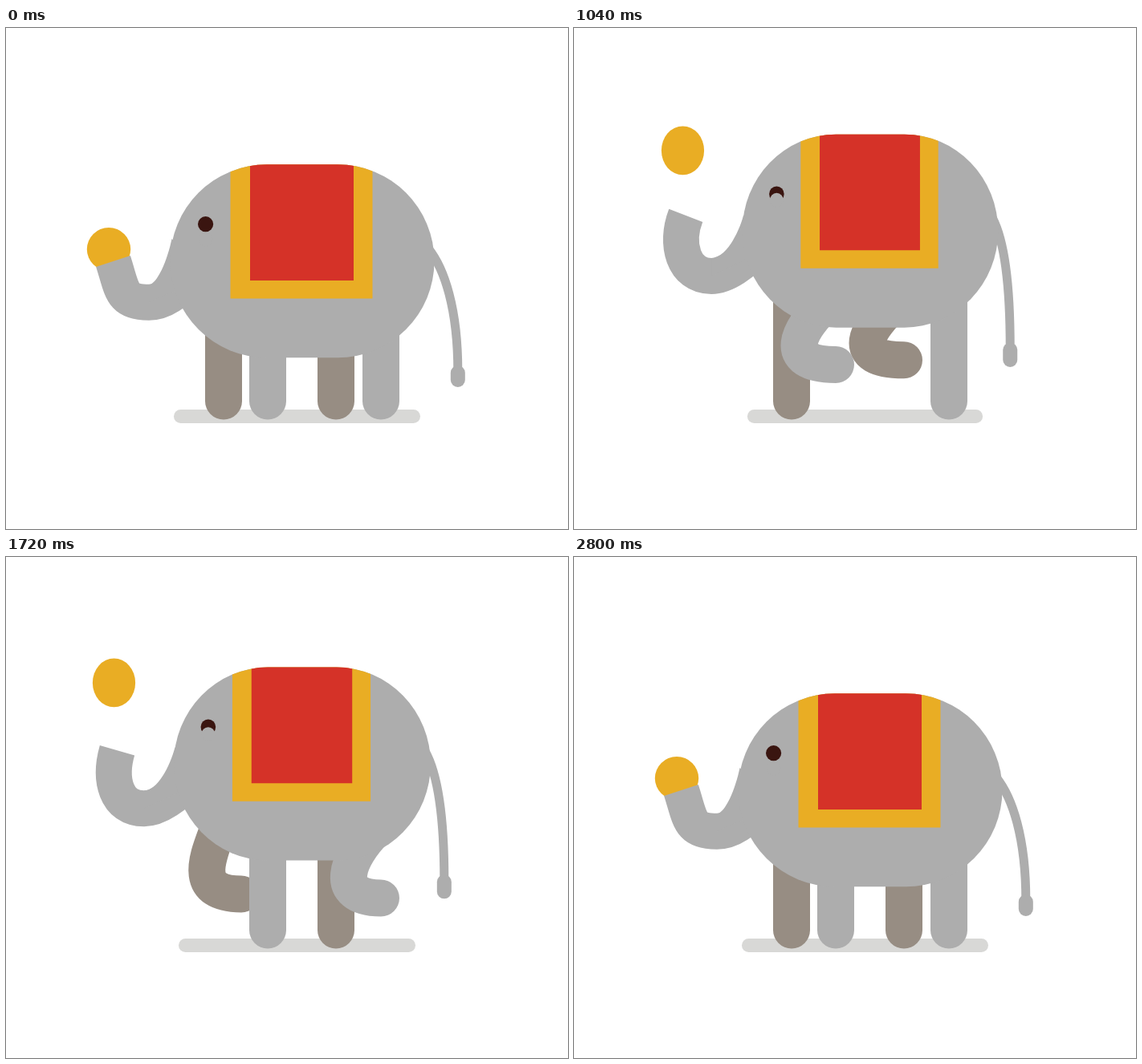
Animation, 700 px wide and 625 px high, one loop 3000 ms. Source, as an HTML page with a canvas:

```html
<!DOCTYPE html>
<html lang="en">
<head>
<meta charset="utf-8">
<title>Elephant</title>
<style>
html, body { margin: 0; width: 100%; height: 100%; overflow: hidden; background: #fff; }
canvas { display: block; }
</style>
</head>
<body>
<canvas id="stage" width="700" height="625"></canvas>
<script>
const ctx = document.getElementById('stage').getContext('2d');
const GREY = '#adadad', FAR = '#978d83', GOLD = '#e9ad24', RED = '#d53228',
      SHADE = '#d8d8d6', EYE = '#3a1510';
// Time is counted in steps; each hop lasts HOP steps.
const LOOP = 3000, STEP = 40, LAST = 70, HOP = 16, HOPS_END = 4 * HOP;
const PEAK = 9, THROW = 2.3;

const ease = x => x ** 1.75 / (x ** 1.75 + (1 - x) ** 1.75);

// Rise from start to PEAK, fall back until the hop ends.
function hump(t, start) {
  if (t <= start) return 0;
  return t < PEAK ? ease((t - start) / (PEAK - start)) : ease((HOP - t) / (HOP - PEAK));
}

function line(color, width, draw, cap = 'round') {
  ctx.strokeStyle = color;
  ctx.lineWidth = width;
  ctx.lineCap = cap;
  ctx.beginPath();
  draw();
  ctx.stroke();
}

function fill(color, draw) {
  ctx.fillStyle = color;
  ctx.beginPath();
  draw();
  ctx.fill();
}

const oval = (color, x, y, rx, ry) =>
  fill(color, () => ctx.ellipse(x, y, rx, ry, 0, 0, Math.PI * 2));

const rect = (color, x1, y1, x2, y2) =>
  fill(color, () => ctx.rect(x1, y1, x2 - x1, y2 - y1));

const bodyShape = dy => ctx.roundRect(204.5, 170.3 + dy, 329, 241, 120.5);

// The knee swings back by k while the foot is lifted.
function leg(color, x, k, lift = 40, reach = 0) {
  const foot = 465.5 - lift * k, fx = x + reach * k;
  line(color, 46, () => {
    ctx.moveTo(x - 7 * k, 340);
    ctx.bezierCurveTo(fx - 42 * k, 375, fx - 62 * k, foot, fx, foot);
  });
}

function ballTop(n, t) {
  const fall = 121 + 1.38 * (t - PEAK) ** 2;
  const landed = 121 + 1.38 * (t + HOP - PEAK) ** 2;
  if (n >= HOPS_END) return Math.min(249, landed);
  if (t < THROW) return n < HOP ? 249 - 1.5 * t : Math.min(247, landed);
  return t < PEAK ? 121 + 121 * ((PEAK - t) / (PEAK - THROW)) ** 2.17 : fall;
}

function drawBall(n, t, sway) {
  const top = ballTop(n, t), height = Math.max(0, (249 - top) / 128);
  const ry = 27 + 3.5 * Math.sqrt(height);
  oval(GOLD, 128 + 6.5 * sway, top + ry, 27.2 - height * 0.6, ry);
}

function drawTrunk(s) {
  const angle = (34 * s - 18) * Math.PI / 180;
  const tipX = 133.5 + 5 * s, tipY = 291 - 17 * s;
  const lowX = 178 - 6 * s, lowY = 342.3 + 4.2 * s;
  line(GREY, 45, () => {
    ctx.moveTo(tipX, tipY);
    ctx.bezierCurveTo(tipX - 38 * Math.sin(angle), tipY + 38 * Math.cos(angle),
      lowX - 35, lowY, lowX, lowY);
    ctx.bezierCurveTo(lowX + 18, lowY, 212, 330, 228, 312);
  }, 'butt');
  // Smooth the corner between trunk and forehead.
  fill(GREY, () => {
    ctx.moveTo(206.5 + 4 * s, 263 + 7 * s);
    ctx.bezierCurveTo(201 + 3 * s, 290 + 5 * s, 188, lowY - 22.3, lowX, lowY - 22.3);
    ctx.lineTo(lowX, lowY);
    ctx.lineTo(250, 310);
  });
}

function drawTail(s) {
  const endX = 562.8 - 17 * s;
  line(GREY, 11, () => {
    ctx.moveTo(526 - 4 * s, 275);
    ctx.bezierCurveTo(546 - 10 * s, 300, endX, 350, endX, 428 + 8 * s);
  });
  fill(GREY, () => ctx.roundRect(endX - 9, 421 + 8 * s, 18, 27 + 3 * s, 9));
}

function drawBlanket(flap) {
  ctx.save();
  ctx.beginPath();
  bodyShape(-flap);
  ctx.clip();
  rect(GOLD, 279.5, 140, 456.5, 337.5);
  rect(RED, 304, 140, 433, 315);
  ctx.restore();
}

function draw(n) {
  const hopping = n < HOPS_END;
  const t = hopping ? n % HOP : n - HOPS_END;
  const sway = hopping ? 1.2 * hump(t, 0) : 0;
  const rise = hopping ? 39.3 * hump(t, 2) : 0;
  const bend = hopping ? 1.25 * Math.sin(Math.PI * t / HOP) ** 1.2 : 0;
  const odd = Math.floor(n / HOP) % 2;
  const bendA = odd ? 0 : bend, bendB = odd ? bend : 0;
  // The cloth floats up as the body lands, then settles.
  const touch = n - HOP * Math.max(1, Math.round(n / HOP));
  const flap = Math.abs(touch) < 3 ? 10 * Math.cos(touch * Math.PI / 6) ** 2 : 0;

  rect('#fff', 0, 0, 700, 625);
  const half = 145 - 6 * sway;
  line(SHADE, 17, () => {
    ctx.moveTo(362.5 - half, 484.5);
    ctx.lineTo(362.5 + half, 484.5);
  });

  leg(FAR, 271, bendA, 45, 22);
  leg(FAR, 411, bendB, 45);
  drawBall(n, t, sway);
  leg(GREY, 326, bendB);
  leg(GREY, 467, bendA);

  ctx.save();
  ctx.translate(0, -rise);
  drawTrunk(sway);
  drawTail(sway);
  // The body gets slimmer in the air.
  ctx.translate(368, 0);
  ctx.scale(1 - 0.0275 * sway, 1);
  ctx.translate(-368, 0);
  fill(GREY, () => bodyShape(0));
  drawBlanket(flap);
  oval(EYE, 248.6, 244.7, 9.6, 9.6);
  // The cheek pushes over the eye as the trunk swings up.
  oval(GREY, 248.6, 263.7 - 10 * sway, 8.7, 8.7);
  ctx.restore();
}

function tick() {
  draw(Math.min(LAST, Math.floor(performance.now() % LOOP / STEP)));
  requestAnimationFrame(tick);
}
tick();
</script>
</body>
</html>
```
